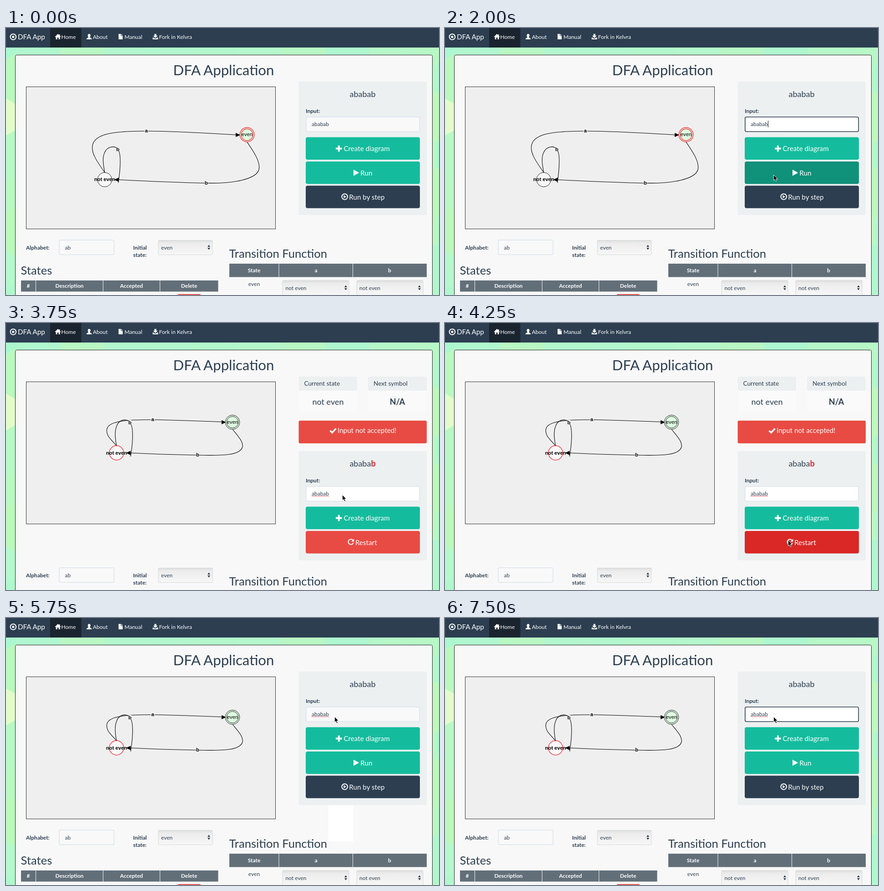
An HTML page for the animation above (8 s loop, 952 by 588 pixels).

```html
<!DOCTYPE html>
<html lang="en">
<head>
<meta charset="utf-8">
<title>DFA App</title>
<style>
  html, body { margin: 0; width: 100%; height: 100%; overflow: hidden; }
  svg { display: block; }
  text { font: 12px Lato, sans-serif; fill: #2c3e50; }
  .bold text, text.bold, .bold { font-weight: 700; }
  .mid text, text.mid { text-anchor: middle; }
  .white text, .white { fill: #fff; }
  .h1 { font-size: 31.2px; }
  .h2 { font-size: 25.6px; }
  .lead { font-size: 18px; }
  .btn text, .brand { font-size: 15.2px; }
  .title { font-size: 13.6px; }
  .field { fill: #f9f9f9; stroke: #dce4ec; stroke-width: 1.6; }
  .select { fill: url(#bevel); stroke: #d6d8d9; }
  .head { fill: #626f79; }
  .rule { stroke: #f4f6f6; }
  .panel { fill: #ecf0f1; }
  .teal { fill: #14bc9d; }
  .dark { fill: #2c3e50; }
  .red { fill: #e84b43; }
  .teal.hover { fill: #10917a; }
  .red.hover { fill: #d92826; }
  .line { fill: none; stroke: #fff; stroke-width: 2; }
  .graph text { font: 700 11.2px "Liberation Sans", Arial, sans-serif; fill: #000; text-anchor: middle; }
  .graph text.plain { font-weight: 400; }
  .graph .edge { fill: none; stroke: #000; stroke-width: 1.1; }
  .graph .tag { fill: #f4f4f4; }
  .graph circle { fill: #f8f8f8; stroke: #222; }
  .graph .accept { fill: #dffbe2; }
  .graph circle.current { stroke: #f0141e; stroke-width: 1.2; }
</style>
</head>
<body>
<svg width="952" height="588" viewBox="0 0 952 588">
  <defs>
    <linearGradient id="bevel" x2="0" y2="1">
      <stop stop-color="#dcdddd"/><stop offset=".2" stop-color="#ececec"/><stop offset="1" stop-color="#f7f7f7"/>
    </linearGradient>
    <path id="sort" class="dark" d="M-3-1 0-5.5 3-1zM-3 1 0 5.5 3 1z"/>
  </defs>

  <g id="backdrop"></g>
  <rect x="20.5" y="59.5" width="917" height="560" rx="3" fill="#f8f8f8" stroke="#222"/>

  <rect width="952" height="43" class="dark"/>
  <rect x="97" width="68.5" height="43" fill="#1a242f"/>
  <circle cx="15.8" cy="19.5" r="6.3" class="line"/>
  <circle cx="15.8" cy="19.5" r="2.6" class="white"/>
  <g class="white">
    <path d="M107.5 19.5 114 13l2.5 2.4V14h2v3.4l2.2 2.1-.8.8-1.2-1V25h-3v-4h-3v4h-3v-5.7l-1.3 1z"/>
    <path d="M182.8 13c2 0 3.1 1.6 3 3.6-.1 1.600-.8 2.800-1.500 3.500.3 1.600 4.200 1.700 4.200 4.900H177c0-3.200 4-3.300 4.300-4.900-.8-.7-1.500-1.900-1.500-3.500 0-2 1-3.600 3-3.600z"/>
    <path d="M247.500 13h5v4.500h4V25h-9zM253.500 13l3 3.500h-3z"/>
    <path d="M326.500 13h4v4h3l-5 5-5-5h3zM322.500 21h2.500l1.500 2h4l1.500-2h2.500v4h-12z"/>
    <text x="26" y="25" class="brand">DFA App</text>
    <text x="121.500" y="24">Home</text>
    <text x="191" y="24">About</text>
    <text x="260.500" y="24">Manual</text>
    <text x="336.500" y="24">Fork in Kelvra</text>
  </g>

  <text x="478.500" y="104" class="h1 mid">DFA Application</text>
  <rect x="44.500" y="129.500" width="548" height="313" fill="#efefef" stroke="#333"/>

  <g id="graphBefore" class="graph">
    <path class="edge" d="M217 318C197 290 188 275 190 260 193 232 240 227 308 227 370 227 450 232 508 235.500"/>
    <path class="edge" d="M217 318C214 300 211 286 217 274 222 262 238 257 246 267 253 276 252 306 247 341"/>
    <path class="edge" d="M530 251C545 273 560 295 556 312 550 333 500 343 440 341.500 400 341 300 337 246 334"/>
    <path d="M505 231l10 4.500-10 4.500z"/>
    <circle cx="217" cy="334" r="15.800"/>
    <path d="M248 329.500l-10 4.500 10 5z"/>
    <circle class="accept current" cx="530" cy="235" r="15.800"/>
    <circle class="accept current" cx="530" cy="235" r="12.800"/>
    <path class="tag" d="M304.500 222h8v9h-8zM242.500 262h7v9h-7zM437 336h7v10h-7z"/>
    <text x="308.500" y="230">a</text><text x="246" y="270.500">b</text><text x="440.500" y="345">b</text>
    <text x="217" y="337">not even</text><text class="plain" x="530" y="238">even</text>
  </g>
  <g id="graphAfter" class="graph">
    <path class="edge" d="M243 270C228 254 219 246 222 233 227 215 268 213 322 213 380 214 430 216 478 218"/>
    <path class="edge" d="M243 270C240 255 238 240 243 228 247 214 262 209 272 218 281 229 279 262 274 294"/>
    <path class="edge" d="M498 234C510 249 522 261 520 273 515 291 480 292.500 421 291 370 290 310 288 272 286"/>
    <path d="M474 214l10 4.500-10 4.500z"/>
    <circle class="current" cx="243" cy="286" r="15.800"/>
    <path d="M274 281.500l-10 4.500 10 5z"/>
    <circle class="accept" cx="498" cy="218.500" r="15.800"/>
    <circle class="accept" cx="498" cy="218.500" r="12.800"/>
    <path class="tag" d="M318.500 208h8v9h-8zM269 214h7v9h-7zM418 285h7v10h-7z"/>
    <text x="322.500" y="216">a</text><text x="272.500" y="222.500">b</text><text x="421.500" y="294">b</text>
    <text x="243" y="289.500">not even</text><text class="plain" x="498" y="222">even</text>
  </g>

  <g id="verdict">
    <path fill="#fafafa" d="M644 149h128v46H644zM796 149h129v46H796z"/>
    <path class="panel" d="M644 149v-28q0-3 3-3h122q3 0 3 3v28zM796 149v-28q0-3 3-3h123q3 0 3 3v28z"/>
    <text x="655.500" y="138" class="title">Current state</text>
    <text x="808" y="138" class="title">Next symbol</text>
    <g class="mid">
      <text x="708" y="180" class="lead">not even</text>
      <text x="860.500" y="180" class="lead bold">N/A</text>
    </g>
    <rect x="643.500" y="215" width="281.500" height="50" rx="3" class="red"/>
    <path class="line" style="stroke-width:3.500" d="M712.500 237l4.500 4.500 8.500-9"/>
    <g class="btn white"><text x="729" y="242">Input not accepted!</text></g>
  </g>

  <rect id="patch" x="709" y="412" width="54.500" height="80" class="white"/>

  <g id="form">
    <rect id="formPanel" x="643.500" y="118" width="281.500" rx="3" class="panel"/>
    <text x="784" y="152" class="lead mid">ababa<tspan id="lastSymbol">b</tspan></text>
    <text x="659" y="187" class="bold">Input:</text>
    <rect id="input" x="659.800" y="196" width="249.400" height="32.300" rx="3" class="field"/>
    <text x="672" y="216">ababab</text>
    <path id="spelling" d="M672 217.500h38" stroke="#e0303a" stroke-width="1.200" stroke-dasharray="1.600 .8"/>
    <path id="caret" d="M710.500 204v15" stroke="#222"/>
    <g class="btn white">
      <rect id="create" x="659" y="240.500" width="251" height="49.500" rx="4" class="teal"/>
      <path class="line" style="stroke-width:3.800" d="M725 265.500h13.500M731.800 258.800v13.500"/>
      <text x="742.500" y="271">Create diagram</text>
      <g id="runButtons">
        <rect id="run" x="659" y="294" width="251" height="49.500" rx="4" class="teal"/>
        <path d="M764 312l12.500 6.800-12.500 6.800z"/>
        <text x="779.300" y="324.500">Run</text>
        <rect x="659" y="347.300" width="251" height="49.500" rx="4" class="dark"/>
        <circle cx="744.700" cy="371.500" r="6.300" class="line"/>
        <path d="M742.500 368l5.500 3.500-5.500 3.500z"/>
        <text x="754.300" y="378">Run by step</text>
      </g>
      <g id="restartButton">
        <rect id="restart" x="659" y="294" width="251" height="49.500" rx="4" class="red"/>
        <path class="line" d="M763 314.500a5.800 5.800 0 1 0 .8 5.500"/>
        <path d="M765.300 311.500v6h-6z"/>
        <text x="768" y="324.500">Restart</text>
      </g>
    </g>
  </g>

  <g id="lower">
    <g class="bold">
      <text x="44" y="487.500">Alphabet:</text>
      <text x="279.500" y="487.500">Initial</text>
      <text x="279.500" y="504">state:</text>
    </g>
    <rect x="117" y="467" width="120.500" height="32.300" rx="3" class="field"/>
    <text x="129.500" y="487.500">ab</text>
    <rect x="335" y="467.500" width="119" height="32" rx="2" class="select"/>
    <text x="341" y="487.500">even</text>
    <use href="#sort" x="446" y="483"/>
    <text x="32.500" y="543" class="h2">States</text>
    <text x="490.500" y="506" class="h2">Transition Function</text>
    <path class="head" d="M33 556h433.500v24.500H33zM491 519h434v29.500H491z"/>
    <path class="rule" d="M65.500 556v24.500M213.500 556v24.500M338.500 556v24.500M600 519v29.500M762.500 519v29.500"/>
    <g class="mid bold white">
      <text x="49" y="572">#</text>
      <text x="139.500" y="572">Description</text>
      <text x="276" y="572">Accepted</text>
      <text x="402.500" y="572">Delete</text>
      <text x="545.500" y="538">State</text>
      <text x="681.500" y="538">a</text>
      <text x="843.500" y="538">b</text>
    </g>
    <rect x="377" y="586" width="51.500" height="24" rx="3" class="red"/>
    <text x="545.500" y="568" class="mid">even</text>
    <rect x="608" y="556" width="146" height="33" rx="2" class="select"/>
    <rect x="771" y="556" width="146" height="33" rx="2" class="select"/>
    <text x="614.500" y="576.500">not even</text>
    <text x="777" y="576.500">not even</text>
    <use href="#sort" x="747" y="572"/>
    <use href="#sort" x="909" y="572"/>
  </g>

  <path id="cursor" d="M.5.500V12.800L3.200 10.300 5.200 14.800 7.400 13.800 5.400 9.500H9.200z" stroke="#fff" stroke-width=".9"/>
</svg>

<script>
const LOOP = 8000;
const $ = id => document.getElementById(id);
const show = (id, on) => $(id).style.display = on ? '' : 'none';
const within = (t, ...spans) => spans.some(([from, to]) => t >= from && t < to);
const latest = (steps, t) => steps.findLast(([start]) => start <= t);

const cursorSteps = [
  [250, 693, 283], [500, 704, 295], [750, 721, 319], [1000, 719, 321],
  [1250, 716, 320], [1500, 714, 326], [1750, 720, 327], [2000, 722, 323],
  [3750, 739, 378], [4000, 745, 445], [4250, 754, 478], [5000, 753, 477],
  [5250, 710, 227], [5500, 720, 217], [5750, 722, 217],
];
const borderSteps = [
  [0, '#dce4ec'], [1000, '#8491a0'], [1250, '#2c3e50'],
  [2500, '#abb5bf'], [2750, '#dce4ec'], [6000, '#2c3e50'],
];

function drawBackdrop() {
  const hex = (x, y, fill) => {
    const points = [0, 1, 2, 3, 4, 5].map(k =>
      [x + 56 * Math.sin(k * Math.PI / 3), y + 56 * Math.cos(k * Math.PI / 3)].map(Math.round));
    return `<polygon points="${points.join(' ')}" fill="${fill}"/>`;
  };
  let cells = '<rect width="952" height="588" fill="#b3f6cd"/>';
  for (let row = 0; row < 8; row++) {
    for (let col = 0; col < 11; col++) {
      const noise = Math.abs(Math.sin(col * 12.9 + row * 78.2) * 437.5) % 1;
      cells += hex(col * 97 + row % 2 * 48 - 26, row * 84 + 28,
        `hsl(${148 - 34 * noise ** 2} 82% ${82 + 4 * noise}%)`);
    }
  }
  $('backdrop').innerHTML = cells + hex(-26, 196, '#e3fbcb');
}

function render(t) {
  const result = within(t, [2500, 4750]);
  show('graphBefore', t < 2500);
  show('graphAfter', t >= 2500);
  show('verdict', result);
  show('restartButton', result);
  show('runButtons', !result);
  $('form').setAttribute('transform', `translate(0 ${result ? 164 : 0})`);
  $('formPanel').setAttribute('height', result ? 240.5 : 294);
  $('lower').setAttribute('transform', `translate(0 ${result ? 72 : 0})`);
  $('lastSymbol').style.cssText = result ? 'fill:#e0282e;font-weight:700' : '';

  $('input').style.stroke = latest(borderSteps, t)[1];
  $('input').style.fill = within(t, [1000, 2500], [2750, 4750], [6000, LOOP]) ? '#fff' : '';
  show('caret', within(t, [1000, 1500], [2000, 2500], [6250, 7000], [7250, 7500]));
  show('spelling', t >= 2500);
  show('patch', within(t, [5250, 7500]));
  $('run').classList.toggle('hover', within(t, [1000, 2500]));
  $('create').classList.toggle('hover', within(t, [4000, 4250]));
  $('restart').classList.toggle('hover', within(t, [4250, 4750]));

  const step = latest(cursorSteps, t);
  show('cursor', step);
  if (step) $('cursor').setAttribute('transform', `translate(${step[1]} ${step[2]})`);
}

drawBackdrop();
const start = performance.now();
(function tick() {
  render((performance.now() - start) % LOOP);
  requestAnimationFrame(tick);
})();
</script>
</body>
</html>
```
